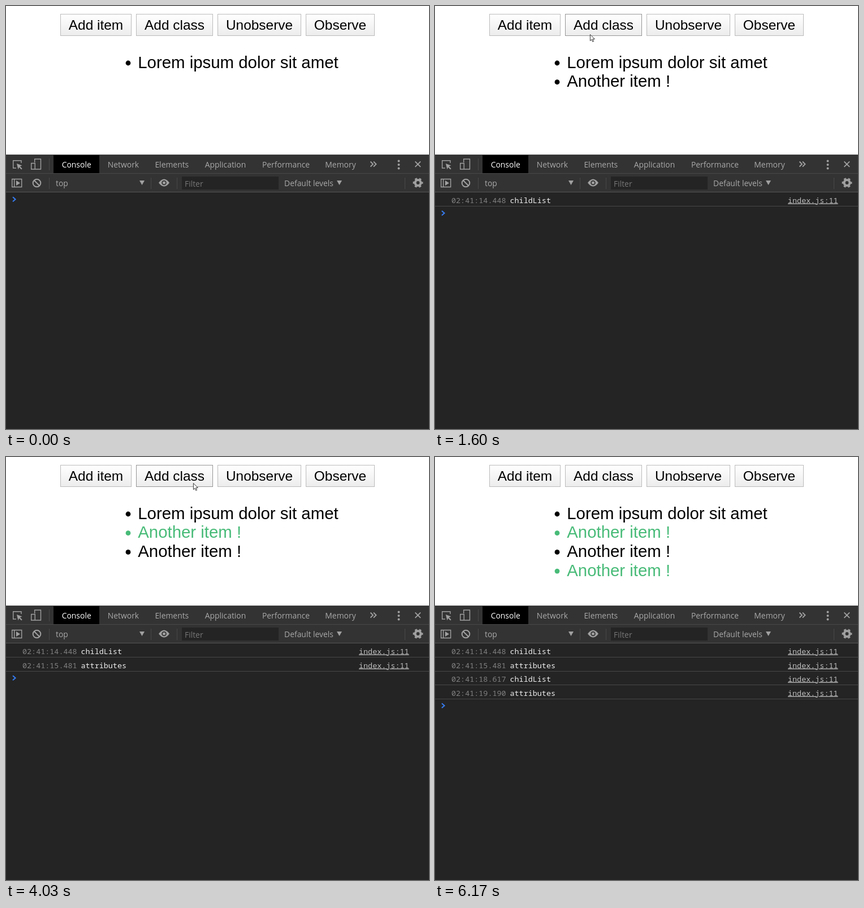
Recreate the animation shown at these times as an HTML page. Size 748 by 749 pixels, loop 7.21 s.

```html
<!DOCTYPE html>
<html lang="en">
<head>
<meta charset="utf-8">
<title>Mutation observer demo</title>
<style>
html, body { margin: 0; width: 100%; height: 100%; overflow: hidden; background: #fff; }
svg { display: block; width: 748px; height: 749px; }
text { white-space: pre; }
.page { font-family: "Liberation Sans", Arial, sans-serif; }
.button rect { fill: url(#face); stroke: #bbb; }
.button.hover rect { stroke: #959595; }
.button.press rect { fill: url(#pressed); }
.button text { font-size: 24.44px; text-anchor: middle; }
.item { font-size: 29.4px; }
.item.green { fill: #48bb78; }
.tools { font: 13.9px "Open Sans", "Noto Sans", sans-serif; fill: #a9a9a9; }
.tabs { text-anchor: middle; }
.icon { fill: none; stroke: #a0a0a0; stroke-width: 1.4; }
.solid { fill: #a0a0a0; stroke: none; }
.log { font: 13.43px "Noto Sans Mono", "DejaVu Sans Mono", monospace; }
.rule { stroke: #484848; fill: none; }
</style>
</head>
<body>
<svg viewBox="0 0 748 749">
  <defs>
    <linearGradient id="face" x2="0" y2="1"><stop stop-color="#fff"/><stop offset="1" stop-color="#ececec"/></linearGradient>
    <linearGradient id="pressed" x2="0" y2="1"><stop stop-color="#e6e6e6"/><stop offset="1" stop-color="#f0f0f0"/></linearGradient>
  </defs>
  <g class="page" id="buttons"></g>
  <g class="page" id="items"></g>

  <path fill="#242424" d="M0 263H748V749H0z"/>
  <path fill="#333" d="M0 263H748V329H0z"/>
  <path class="rule" d="M0 263.5H748M0 296.5H748M76.5 270v21M76.5 304v20M256.5 304v20M302.5 304v20M705.5 304v20"/>
  <path d="M0 329.5H748" stroke="#555"/>
  <path d="M84 264h81v32h-81z"/>
  <path fill="#242424" d="M311 302h171v23h-171z"/>
  <g class="tools">
    <g class="tabs" id="tabs"></g>
    <text x="88" y="319">top</text>
    <text x="316" y="319.5" fill="#777">Filter</text>
    <text x="492" y="319">Default levels</text>
  </g>
  <g class="icon">
    <path d="M27 278v-4.3H12.7V287H18"/>
    <path class="solid" d="M19 279l9.5 3.5-3.8 1.6 4 4-1.5 1.5-4-4-1.6 3.8z"/>
    <path d="M50.7 277V271H61.5V289H52M44.7 278.5h6.6V289h-6.6z"/>
    <path stroke-width="1.8" d="M644.5 275.5l4.5 4.5-4.5 4.5M650 275.5l4.5 4.5-4.5 4.5M723.5 275.3l9.6 9.6M733.1 275.3l-9.6 9.6"/>
    <path stroke-width="4" stroke-linecap="round" d="M694.5 274.5h.01M694.5 281h.01M694.5 287.5h.01"/>
    <path d="M10.7 306.5h17V320.5h-17zM14.7 306.5v14"/>
    <path class="solid" d="M18 309l7 4.5-7 4.5zM236 309h9l-4.5 8zM585 309h9l-4.5 8z"/>
    <g stroke-width="2"><circle cx="54.5" cy="313.5" r="6.8"/><path d="M49.7 308.7l9.6 9.6"/></g>
    <path class="solid" d="M270 313q9.5-13 19 0-9.5 13-19 0z"/>
    <circle cx="279.5" cy="313" r="3.4" fill="#a0a0a0" stroke="#333" stroke-width="1.8"/>
    <circle cx="728.5" cy="313" r="4.9" stroke-width="4"/>
    <circle cx="728.5" cy="313" r="7.5" stroke-width="2.8" stroke-dasharray="3.927" stroke-dashoffset="1.96"/>
  </g>
  <g class="log" id="log"></g>
  <path id="prompt" fill="none" stroke="#367cf1" stroke-width="2" d="M12 338.2l4.6 4-4.6 4"/>
  <path id="cursor" fill="#fff" stroke="#222" stroke-width=".9" d="M.4.5v11.2l2.6-2.4 1.8 4 1.8-.8-1.8-3.9h3.6z"/>
</svg>
<script>
const $ = id => document.getElementById(id);
const LOOP = 7210, FRAME = 100 / 3;

// All times below count ticks of 1/30 s.
const buttons = [["Add item", 96, 222], ["Add class", 230, 366], ["Unobserve", 374, 522], ["Observe", 530, 652]];
const items = [
  { text: "Lorem ipsum dolor sit amet", from: 0 },
  { text: "Another item !", from: 31, green: 62 },
  { text: "Another item !", from: 112 },
  { text: "Another item !", from: 157, green: 174 }
];
const logs = [
  [31, "02:41:14.448", "childList"], [62, "02:41:15.481", "attributes"],
  [157, "02:41:18.617", "childList"], [174, "02:41:19.190", "attributes"]
];
const tabs = [["Console", 124.7], ["Network", 207.5], ["Elements", 293.3], ["Application", 388], ["Performance", 495], ["Memory", 591.5]];
const presses = [[29, 31], [60, 62], [91, 97], [110, 112], [134, 136], [155, 157], [171, 174]];
const path = [
  [5, 24, 732], [10, 150, 380], [15, 222, 150], [19, 164, 76], [27, 160, 36], [38, 160, 36],
  [48, 274, 50], [59, 300, 36], [74, 300, 36], [90, 416, 33], [97, 416, 33],
  [108, 165, 34], [114, 165, 34], [121, 331, 46], [132, 590, 34], [140, 590, 34],
  [144, 290, 24], [145, 206, 22], [149, 170, 34], [160, 170, 34],
  [170, 296, 38], [179, 296, 38], [184, 10, 154], [188, -120, 200]
];

$("buttons").innerHTML = buttons.map(([label, l, r]) => `<g class="button">
  <rect x="${l + .5}" y="14.5" width="${r - l - 1}" height="38"/>
  <text x="${(l + r) / 2}" y="42.3">${label}</text></g>`).join("");
$("items").innerHTML = items.map(({ text }, i) => `<g class="item" transform="translate(0 ${33.7 * i})">
  <circle cx="216" cy="101" r="4.4"/><text x="233.2" y="109.5">${text}</text></g>`).join("");
$("tabs").innerHTML = tabs.map(([name, x], i) =>
  `<text x="${x}" y="286"${i ? "" : ' fill="#fff"'}>${name}</text>`).join("");
$("log").innerHTML = logs.map(([, time, type], i) => `<g transform="translate(0 ${Math.round(24.5 * i)})">
  <text x="29" y="348.5" fill="#808080">${time}</text>
  <text x="132.5" y="348.5" fill="#eee">${type}</text>
  <text x="624" y="348.5" fill="#bbb" text-decoration="underline">index.js:11</text>
  <path class="rule" d="M0 354.5H748"/></g>`).join("");

// Slope at a key; zero where the pointer rests.
function slope(i, axis) {
  const a = path[Math.max(i - 1, 0)], b = path[i], c = path[Math.min(i + 1, path.length - 1)];
  const rests = (p, q) => p !== q && p[1] === q[1] && p[2] === q[2];
  return rests(a, b) || rests(b, c) ? 0 : (c[axis] - a[axis]) / (c[0] - a[0]);
}

function pointer(t) {
  const i = path.findIndex((key, k) => k + 1 < path.length && t < path[k + 1][0]);
  const a = path[i], b = path[i + 1], d = b[0] - a[0], u = (t - a[0]) / d, v = 1 - u;
  return [1, 2].map(k =>
    a[k] * v * v * (1 + 2 * u) + b[k] * u * u * (3 - 2 * u) +
    d * u * v * (slope(i, k) * v - slope(i + 1, k) * u));
}

const show = (el, on) => { el.style.visibility = on ? "visible" : "hidden"; };

function draw(now) {
  const t = Math.floor((now % LOOP + 4) / FRAME);
  const active = t >= 5 && t < 185;
  const [x, y] = active ? pointer(t) : [-50, -50];
  const down = presses.some(([from, to]) => t >= from && t < to);

  show($("cursor"), active);
  $("cursor").setAttribute("transform", `translate(${x} ${y})`);
  buttons.forEach(([, l, r], i) => {
    const hover = x >= l && x < r && y >= 14 && y < 53, style = $("buttons").children[i].classList;
    style.toggle("hover", hover);
    style.toggle("press", hover && down);
  });
  items.forEach(({ from, green }, i) => {
    const el = $("items").children[i];
    show(el, t >= from);
    el.classList.toggle("green", t >= green);
  });
  logs.forEach(([from], i) => show($("log").children[i], t >= from));
  const count = logs.filter(([from]) => t >= from).length;
  $("prompt").setAttribute("transform", `translate(0 ${24.5 * count})`);
}

const start = performance.now();
function tick() {
  draw(performance.now() - start);
  requestAnimationFrame(tick);
}
tick();
</script>
</body>
</html>
```
